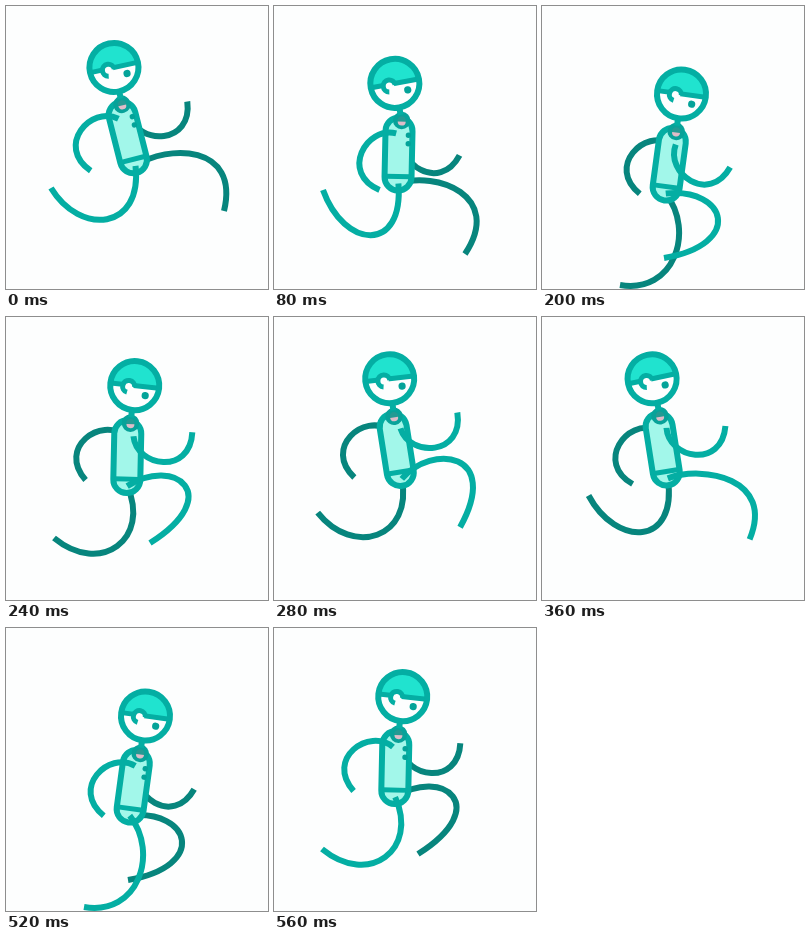
Animation, 262 px wide and 283 px high, one loop 0.6 s. Source, as an HTML page:

```html
<!DOCTYPE html>
<html lang="en">
<head>
<meta charset="utf-8">
<title>Runner</title>
<style>
  html, body { margin: 0; width: 100%; height: 100%; overflow: hidden; background: #fdfefe; }
  svg { display: block; width: 262px; height: 283px; }
  .line { fill: none; stroke: #04aea3; stroke-width: 6; }
  .far { stroke: #07857d; }
  .thin { stroke-width: 5; }
  .skin { fill: #fdfefe; }
  .ink { fill: #04a399; }
</style>
</head>
<body>
<svg viewBox="0 0 262 283">
  <path id="farArm" class="line far"/>
  <path id="farLeg" class="line far"/>
  <g id="torso">
    <rect x="-16" y="-3" width="27" height="73" rx="13.5" class="line" style="fill:#a2f7ea"/>
    <path d="M-15 56H10" class="line thin"/>
    <g id="buttons" class="ink">
      <circle cx="7" cy="14.5" r="2.7"/>
      <circle cx="7" cy="23" r="2.7"/>
    </g>
    <circle r="6.5" fill="#249a93" stroke="#08a299" stroke-width="4.5"/>
    <path d="M-4 1H4A4 4 0 0 1-4 1Z" fill="#dfbcc8"/>
  </g>
  <path id="nearLeg" class="line"/>
  <path id="nearArm" class="line"/>
  <g id="head">
    <path d="M0 24V32" class="line"/>
    <circle r="24.5" class="skin"/>
    <path d="M-24.5 0A24.5 24.5 0 0 1 24.5 0Z" fill="#20e3cf"/>
    <path d="M-24 0H24" class="line thin"/>
    <circle cx="-6" cy="1.5" r="5" class="skin"/>
    <path d="M0 1.5A6 6 0 1 0-7 7.4" class="line thin"/>
    <circle cx="11.5" cy="8.7" r="3.6" class="ink"/>
    <circle r="24.5" class="line"/>
  </g>
</svg>
<script>
// The stride has 16 poses; the loop plays 15 of them, 40 ms each.
const STEP = 40, PLAYED = 15, STRIDE = 16;
const { sin, cos, sqrt, hypot, PI } = Math;
const RAD = PI / 180;

// Key points on the path of the foot: pose, x, y.
const FOOT = [
  [0, 45, 182], [2, 49, 184], [3, 51, 208], [5, 122, 252], [6, 144, 226],
  [8, 218, 205], [10, 191, 248], [11, 216, 271], [13, 78, 279], [14, 48, 221]
];

const el = id => document.getElementById(id);
const place = (id, { x, y, tilt }) =>
  el(id).setAttribute('transform', `translate(${x} ${y}) rotate(${tilt})`);

// A point given in a part's own coordinates, on the stage.
function onStage({ x, y, tilt }, px, py) {
  const c = cos(tilt * RAD), s = sin(tilt * RAD);
  return [x + px * c - py * s, y + px * s + py * c];
}

// Smooth closed path through the key points.
function footAt(pose) {
  const n = FOOT.length;
  const i = FOOT.findLastIndex(key => key[0] <= pose);
  const [a, b, c, d] = [i - 1, i, i + 1, i + 2].map(j => {
    const [t, x, y] = FOOT[(j + n) % n];
    return [t + STRIDE * Math.floor(j / n), x, y];
  });
  const span = c[0] - b[0], u = (pose - b[0]) / span, v = 1 - u;
  return [1, 2].map(k => {
    const leave = (c[k] - a[k]) / (c[0] - a[0]) * span;
    const arrive = (d[k] - b[k]) / (d[0] - b[0]) * span;
    return v * v * (1 + 2 * u) * b[k] + u * u * (1 + 2 * v) * c[k]
      + u * v * (v * leave - u * arrive);
  });
}

// Rubber hose: each handle is [along, across] the line from root to tip.
function hose(id, root, tip, from, to) {
  const dx = tip[0] - root[0], dy = tip[1] - root[1], len = hypot(dx, dy);
  const handle = ([x, y], [along, across]) =>
    [x + (dx * along + dy * across) / len, y + (dy * along - dx * across) / len];
  el(id).setAttribute('d', `M${root}C${handle(root, from)},${handle(tip, to)},${tip}`);
}

function drawLeg(id, torso, pose) {
  const hip = onStage(torso, -2, 63), foot = footAt(pose);
  const len = hypot(foot[0] - hip[0], foot[1] - hip[1]);
  const bend = 0.65 * sqrt(Math.max(0, 126 ** 2 - len ** 2));
  const skew = 0.22 * cos(pose * 2 * PI / STRIDE - 0.3) - 0.12;
  hose(id, hip, foot, [0.75 * (len - 75), bend * (1 + skew)], [-16, bend * (1 - skew)]);
}

function drawArm(id, torso, pose) {
  const a = pose * 2 * PI / STRIDE;
  const [x, y] = onStage(torso, -1 - 6 * cos(a), 13);
  const swing = RAD * (64 + 72 * cos(a) - 18 * sin(a) - 12 * cos(2 * a) - 6 * cos(3 * a));
  hose(id, [x, y], [x + 59 * cos(swing), y + 59 * sin(swing)], [1, -31], [-5, -43]);
}

function draw(pose) {
  const a = pose * 2 * PI / STRIDE, b = 2 * a;
  const head = {
    x: 124.8 - 17.3 * cos(b - 0.23),
    y: 74.9 - 17.1 * cos(b + 0.13) + 1.9 * cos(2 * b) + 2.7 * cos(3 * b + 0.93),
    tilt: -2 - 12 * cos(b - 0.54) + 2.3 * sin(3 * b)
  };
  const [x, y] = onStage(head, 0, 37.8);
  const torso = { x, y, tilt: -0.6 - 11.8 * cos(b) - 1.8 * cos(2 * b) };
  const other = (pose + STRIDE / 2) % STRIDE;

  place('head', head);
  place('torso', torso);
  drawLeg('nearLeg', torso, pose);
  drawArm('nearArm', torso, pose);
  drawLeg('farLeg', torso, other);
  drawArm('farArm', torso, other);
  // The near arm hides the buttons unless it swings back.
  el('buttons').style.display = cos(a) > 0.1 ? '' : 'none';
}

function tick() {
  draw(Math.floor(performance.now() / STEP) % PLAYED);
  requestAnimationFrame(tick);
}
tick();
</script>
</body>
</html>
```
